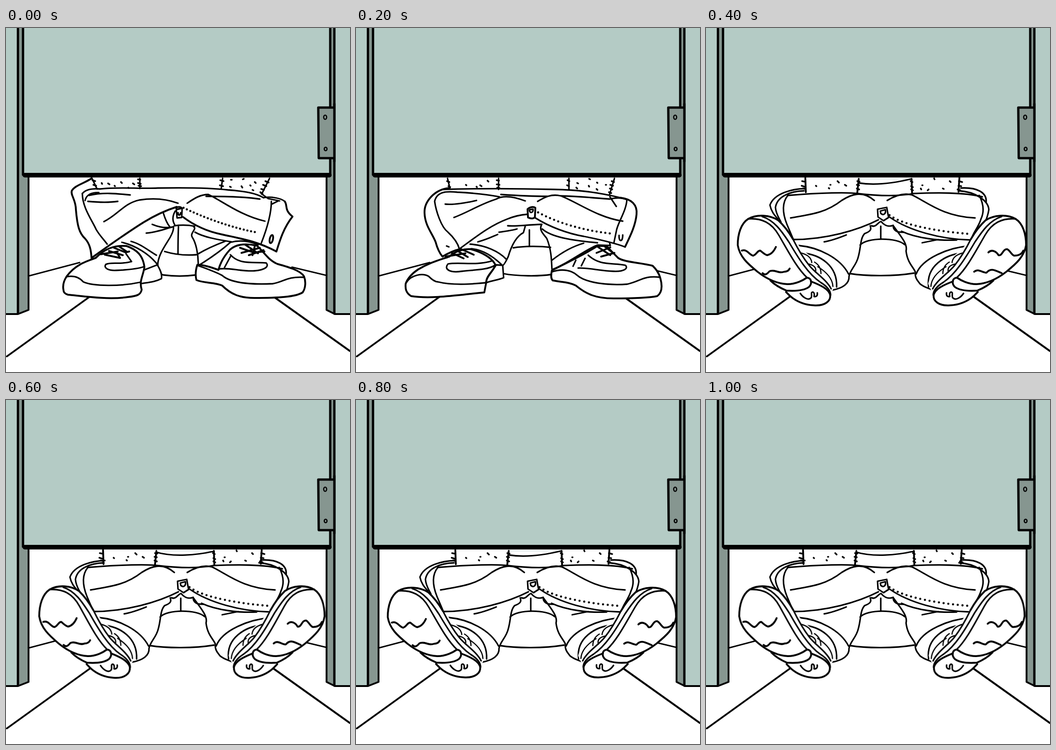
Animation of 748 by 748 pixels, one loop 1200 ms. Source, as an HTML page without scripts:

```html
<!DOCTYPE html>
<html lang="en">
<head>
<meta charset="utf-8">
<title>Stall</title>
<style>
html, body { margin: 0; width: 100%; height: 100%; overflow: hidden; background: #fff; }
svg { display: block; width: 100%; height: 100%; }
path, ellipse { fill: none; stroke: #000; stroke-width: 3.3; stroke-linecap: round; stroke-linejoin: round; }
.w { fill: #fff; }
.b { stroke-width: 4; }
.t { stroke-width: 2.6; }
.mask { fill: #fff; stroke: none; }
.hair { stroke-width: 3.6; }
.dots { stroke-width: 4.8; stroke-dasharray: 0 9; }
.pale { stroke: #dce8e8; stroke-width: 2; }
.lit { fill: #b4cbc5; }
.dim { fill: #869690; }
.pose { animation: 1.2s step-end infinite; }
.sit { animation-name: sit; }
.slide { animation-name: slide; }
.lift { animation-name: lift; }
.kick { transform-origin: 230px 560px; animation: kick .4s step-end infinite; }
.legL { animation: legL .4s step-end infinite; }
.legR { animation: legR .4s step-end infinite; }
.seatA { animation: seatA .4s step-end infinite; }
.seatB { animation: seatB .4s step-end infinite; }
@keyframes sit { 0% { visibility: visible } 16.6667%, 100% { visibility: hidden } }
@keyframes slide { 0% { visibility: hidden } 16.6667% { visibility: visible } 33.3333%, 100% { visibility: hidden } }
@keyframes lift { 0% { visibility: hidden } 33.3333%, 100% { visibility: visible } }
@keyframes kick { 0% { transform: none } 50%, 100% { transform: scale(.98, 1.02) } }
@keyframes legL { 0% { transform: none } 50%, 100% { transform: translateX(-5px) } }
@keyframes legR { 0% { transform: none } 50%, 100% { transform: translateX(5px) } }
@keyframes seatA { 0% { opacity: 1 } 50%, 100% { opacity: 0 } }
@keyframes seatB { 0% { opacity: 0 } 50%, 100% { opacity: 1 } }
</style>
</head>
<body>
<svg viewBox="0 0 748 748">
<defs>
  <g id="foot">
    <path class="mask" d="M92 415C112 404 140 407 157 418C172 436 186 456 202 473C212 487 225 492 238 506C258 523 280 541 282 556L271 580C270 600 250 605 225 602C200 596 184 584 175 571C150 558 73 510 69 472C69 448 76 425 92 415Z"/>
    <path class="b" d="M92 415C76 425 69 448 69 472C73 497 90 512 112 530C135 548 157 556 177 557C196 557 212 548 219 543C229 543 232 555 224 563C212 572 190 572 175 571C163 566 150 559 140 549"/>
    <path class="b" d="M174 574L183 583C196 594 214 602 234 603C258 605 272 594 270 580C266 567 249 559 228 551"/>
    <path d="M92 415C122 413 143 424 158 450C179 486 198 523 220 543"/>
    <path d="M122 410C148 418 164 441 180 465C200 499 222 535 249 553C262 561 271 570 271 581"/>
    <path class="b" d="M92 415C112 404 140 407 157 418C170 430 181 445 189 459"/>
    <path d="M189 459C198 477 212 501 225 517C238 533 262 547 272 567"/>
    <path class="t" d="M206 489C222 493 229 500 230 510M222 513C234 515 241 521 238 531M236 509C246 515 250 524 250 534M243 519C261 530 275 545 276 562"/>
    <path d="M205 577C211 586 223 594 229 586C231 580 227 575 232 574C236 575 236 579 235 584C240 585 243 582 242 576"/>
  </g>
</defs>

<path d="M50 539L160 510M622 520L697 538"/>
<path class="b" d="M2 714L190 578.5M576 580L748 702.5"/>

<g class="pose sit">
  <path class="pale" d="M296 327H466"/>
  <path d="M187 327L198 350M291 327V349M471 327L468 349M573 327L556 361"/>
  <path class="hair" d="M208 337l1 2M222 338l3 2M236 343l1 1M250 335l2 2M266 347l1 1M276 338l3 2M287 329l5 1M287 337l6 2M288 343l6 1M188 331l6 2M190 341l6 2M489 330l2 0M487 345l2 1M515 329l2-1M512 344l2 3M531 342l1 1M541 335l2 2M536 352l2 1M466 331l7 2M465 342l7 2M564 333l7 3M559 341l7 3M555 350l6 2M553 357l5 4"/>
  <path d="M166 360C174 350 190 349 204 350C245 345 291 350 330 348C390 347 440 347 482 352C520 355 543 359 560 369"/>
  <path class="b" d="M186 327C170 338 150 342 143 354C140 363 152 374 152 395C155 430 159 446 172 458C183 470 185 485 186 500"/>
  <path d="M166 360C166 390 187 418 196 438C204 452 213 460 220 470M172 375C175 362 187 357 202 358M178 377C200 379 222 380 243 377M181 364C210 357 240 360 270 363M213 421C245 405 255 382 290 374C322 369 350 372 374 381"/>
  <path class="b" d="M186 500C228 470 266 443 300 422C328 405 352 395 371 389"/>
  <path class="w" d="M370 391C374 388 381 388 383 393L382 412L372 413Z"/>
  <path class="b" d="M373 394L381 392M374 402C373 407 379 409 380 402"/>
  <path d="M394 381C410 370 423 362 440 362C470 376 510 408 563 420M435 366C470 366 520 367 552 372"/>
  <path class="dots" style="stroke-dasharray:0 8.2" d="M386 391C425 410 490 435 548 445"/>
  <path class="b" d="M385 411C410 430 440 443 470 449C510 458 545 463 588 486"/>
  <path d="M555 360L570 371L595 376M560 369C576 366 598 370 606 377M578 383L592 376M577 377C577 405 566 440 555 468"/>
  <path class="b" d="M606 377C613 386 604 395 623 410C604 434 596 460 588 486"/>
  <ellipse class="b" cx="577" cy="459" rx="3.5" ry="9" transform="rotate(12 577 459)"/>
  <path d="M252 466C282 473 312 492 329 514M272 464C292 469 310 484 327 494M330 512C333 490 347 472 357 455C362 446 365 438 364 432M305 446C325 445 345 437 361 433M318 427C335 434 350 436 364 432M342 402C345 412 350 425 356 432M368 398C361 410 362 420 367 428"/>
  <path d="M366 430C380 428 395 428 410 431M375 432C374 455 374 475 374 492M345 486C365 492 390 495 414 493M330 512C330 526 334 535 342 537C365 540 390 540 413 537M408 432C416 437 399 446 405 455C413 467 418 490 418 514"/>
  <path d="M411 444C430 455 460 460 490 465M418 491C440 478 460 470 476 464M421 515C445 500 468 484 488 466C510 460 535 464 548 472"/>
  <path class="w" d="M298 527L329 515C335 525 340 535 338 545C325 552 310 553 292 556Z"/>
  <path class="w b" d="M125 570C122 556 128 546 132 540C150 515 175 507 195 500C215 480 235 472 262 474C285 482 298 495 301 520C298 540 289 550 295 569C293 580 285 583 265 585C220 592 160 582 135 580C128 578 125 575 125 570Z"/>
  <path d="M131 541C145 538 158 540 168 552C190 562 250 562 291 553M300 519C285 524 265 526 240 527C225 528 211 523 217 514C228 508 250 515 272 508M261 491L273 508"/>
  <path class="b" d="M206 492L243 486M215 493L248 500L241 488M224 485L254 494M235 478L260 488L268 486M246 475L262 486"/>
  <path class="w b" d="M416 515C411 530 412 540 414 548C430 555 455 553 470 560C490 580 510 587 540 587C590 587 630 585 645 575C652 565 652 550 648 540C640 527 615 520 590 513C570 505 560 485 545 473C520 468 500 470 487 482C475 495 466 510 462 526C445 520 430 515 416 515Z"/>
  <path d="M416 516C440 525 455 530 470 538C490 556 540 558 580 556C605 552 610 540 647 542M463 524C485 520 510 530 540 528C565 526 572 518 566 511C540 508 508 516 488 493M475 521L488 497"/>
  <path class="b" d="M509 478L541 489M520 471L548 490M512 489L552 478M528 494L560 483M541 474L536 494M550 487L562 486"/>
</g>

<g class="pose slide">
  <path class="pale" d="M313 327H461"/>
  <path d="M199 327L204 348M310 327V351M463 327V352M562 327L551 363"/>
  <path class="hair" d="M239 341l1 1M262 345l1 1M270 342l3 2M286 332l2 2M306 331l5 1M306 340l6 1M307 347l5 1M198 333l5 2M201 344l4 2M481 337l2 1M479 347l2 2M507 328l2 1M506 343l1 2M524 336l1 1M523 350l2 2M543 341l1 0M460 331l4 2M459 342l4 2M556 333l5 2M553 341l6 2M552 349l5 2M550 357l5 2"/>
  <path d="M188 351C260 349 350 349 430 351C480 352 520 356 575 369"/>
  <path class="b" d="M203 348C170 351 148 378 149 402C150 430 165 445 173 465C177 480 182 490 188 497C200 490 213 484 225 481"/>
  <path d="M225 481C221 466 212 455 200 444C185 433 174 398 171 377C176 354 200 355 220 357C260 359 290 363 312 367M194 383C215 385 240 380 262 375M213 412C245 400 270 383 305 372C322 362 347 368 368 376M315 362C345 364 390 366 416 366M197 474l5 2"/>
  <path d="M224 481C260 455 290 430 330 415C345 409 360 406 373 405"/>
  <path class="w b" d="M373 394C378 389 386 388 390 391L389 411C386 416 378 414 374 412Z"/>
  <path d="M377 396C378 404 386 402 385 394L378 395"/>
  <path d="M395 377C410 368 425 360 445 365C480 378 525 412 580 420M445 365C490 366 520 370 552 372C565 369 574 368 589 373M552 367L566 388"/>
  <path class="dots" style="stroke-dasharray:0 9.6" d="M396 401C435 422 490 440 555 447"/>
  <path d="M390 413C420 432 460 447 495 453C520 458 555 465 585 476"/>
  <path class="b" d="M575 369C600 372 612 385 610 405C608 430 595 455 585 476"/>
  <path d="M589 373C588 398 568 425 566 442L561 466M572 451C571 466 580 466 580 450"/>
  <path d="M330 430C345 432 370 428 403 427M368 431L364 445C345 455 336 480 331 497C325 510 320 518 317 517M248 470C280 472 310 485 327 503M250 480C275 481 300 498 318 516M265 465C285 460 300 452 308 449M311 444C325 442 340 440 350 437"/>
  <path d="M377 439V473M342 478C365 474 400 474 423 477M320 534C350 540 400 540 424 536M404 427C396 440 410 450 415 458C424 480 425 500 426 524M405 437C425 455 470 462 525 467M426 505C445 490 470 475 495 468M427 525C460 513 498 482 525 472L553 473L551 466"/>
  <path class="w" d="M280 560C282 545 290 538 305 515L319 516L321 543C310 548 295 549 283 554Z"/>
  <path class="w b" d="M108 556C112 545 120 535 135 525C160 510 180 505 203 497C215 485 235 480 250 481C275 488 296 500 303 515C300 528 283 538 283 554L279 575C225 580 165 590 120 583C108 576 107 566 108 556Z"/>
  <path d="M110 553C120 537 145 532 158 540C165 547 172 552 178 552C210 560 250 557 281 554M302 516C285 527 250 526 230 529C205 533 190 525 200 513C225 508 260 518 297 506"/>
  <path class="b" d="M195 497L238 490M206 488L234 501M218 483L243 498M229 481L256 493"/>
  <path class="w b" d="M426 527C423 540 425 547 428 549C450 553 465 553 478 560C500 578 520 588 560 588C600 588 640 586 655 583C666 575 666 560 662 545C658 530 650 522 645 517C620 510 585 510 570 500C560 490 550 480 545 474L525 474C500 490 470 505 426 527Z"/>
  <path d="M427 530C450 522 470 528 480 537C500 555 550 560 590 557C620 550 625 538 661 542M483 522C505 521 530 528 560 529C585 530 592 522 586 516C560 510 530 518 505 494M472 518L478 505M490 517L498 501"/>
  <path class="b" d="M526 476L553 494M523 489L553 477M538 473L560 490M533 497L562 489"/>
</g>

<g class="pose lift">
  <path class="pale" d="M333 328H446"/>
  <path class="seatA" d="M332 337C370 343 410 337 447 328"/>
  <path class="seatB" d="M327 331C365 342 415 337 452 329"/>
  <g class="legL">
    <path class="b" d="M216 326L217 357M332 328L329 358"/>
    <path class="hair" d="M239 343l1 1M267 348l1 1M270 341l1 0M286 333l3 3M302 341l3 2M209 333l5 1M208 343l6 2M211 349l5 1M329 333l5 1M328 341l5 1M328 349l5 2"/>
  </g>
  <g class="legR">
    <path class="b" d="M447 328L448 358M551 326L549 356"/>
    <path class="hair" d="M467 349l1 2M470 342l1 0M484 351l-2 2M496 327l1 2M515 349l2 1M530 333l2 2M445 333l4 2M446 344l4 2M446 351l4 2M550 333l7 2M549 343l6 1M547 351l6 2"/>
  </g>
  <path d="M178 364C250 358 310 357 330 360C390 367 425 365 450 360C500 358 560 357 601 367"/>
  <path d="M215 349C190 350 149 358 139 385C142 400 150 408 156 415M213 354C185 355 155 365 151 390C152 405 160 415 163 422M178 364C165 380 166 402 176 427L190 460M184 413C230 405 260 402 295 375C315 362 340 352 366 375"/>
  <path d="M190 460C260 460 330 440 375 417M257 465C275 462 290 456 305 450"/>
  <path class="w" d="M373 394L393 390L397 412L386 419L374 411Z"/>
  <path d="M379 398L390 395C392 405 385 408 380 403Z"/>
  <path d="M394 375C410 365 430 358 448 363C480 378 515 410 585 413"/>
  <path d="M399 411C440 440 510 460 577 461"/>
  <path class="dots" style="stroke-dasharray:0 10.3" d="M399 407C430 430 510 443 575 448"/>
  <path d="M594 364C604 383 605 400 598 415C592 435 580 445 577 460M554 348C590 346 612 358 609 380M550 354C585 356 614 375 615 395C612 415 605 425 603 432"/>
  <path d="M360 430C370 435 375 420 381 421C390 432 400 432 407 429M380 431V459M335 472C350 455 415 455 432 471M407 430C407 440 415 445 429 444M313 534C350 540 410 540 452 533"/>
  <path d="M357 430C361 440 355 443 345 447C335 457 337 478 331 498C327 516 313 526 311 540C312 556 297 566 274 570M408 431C425 455 439 470 435 485C438 510 450 519 455 530C454 545 461 550 465 556C475 565 490 567 495 572"/>
  <path d="M202 473C245 477 292 500 310 535M207 489C250 492 286 518 284 563M572 474C530 477 470 500 457 535M560 489C520 492 478 518 484 563M425 442C460 458 510 463 545 461M470 467L505 460"/>
  <g class="kick">
    <use href="#foot"/>
    <path class="b" d="M78 484C90 480 95 495 103 495C112 491 111 484 118 484C125 490 128 493 133 494C143 492 148 485 152 476M123 533C128 538 132 536 138 529C150 524 158 535 170 530C177 530 180 527 182 523"/>
  </g>
  <g transform="matrix(-1 0 0 1 765 0)">
    <g class="kick">
      <use href="#foot"/>
      <path class="b" d="M151 488C143 480 133 487 129 494C120 496 120 480 110 481C103 485 101 493 95 495C85 495 78 491 75 484M182 530C173 522 165 532 155 532C145 520 135 528 122 533"/>
    </g>
  </g>
</g>

<g>
  <path class="lit" style="stroke:none" d="M0 0H26V622H0ZM715 0H748V622H715Z"/>
  <path class="dim" style="stroke:none" d="M26 0H38V320H49V613L26 622ZM706 0H715V622L697 613V320H706Z"/>
  <path class="b" d="M49 322V613L26 622H-3M697 322V613L715 622H751"/>
  <path style="stroke-width:5" d="M26 -3V621M714 -3V621"/>
  <path class="lit" style="stroke-width:5" d="M37 -5V319H705V-5"/>
  <path style="stroke-width:10" d="M41 320H703"/>
  <path class="dim" style="stroke-width:5" d="M712 173H679L680 283H712"/>
  <path style="stroke-width:5" d="M714 165V290"/>
  <ellipse class="t" cx="694" cy="194" rx="3.2" ry="4.5"/>
  <ellipse class="t" cx="695" cy="263" rx="3" ry="3.8"/>
</g>
</svg>
</body>
</html>
```
